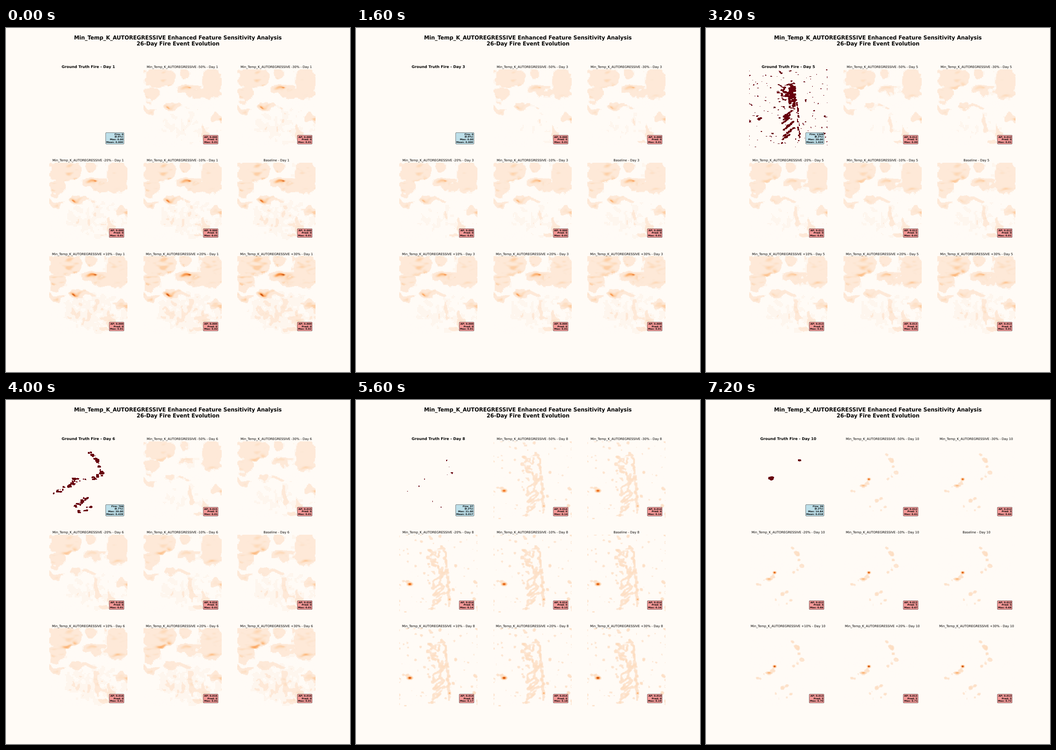
Animation, 748 px wide and 748 px high, one loop 8 s. Source, as a matplotlib script:

```python
import numpy as np
import matplotlib.pyplot as plt
from matplotlib.animation import FuncAnimation
from matplotlib.colors import LinearSegmentedColormap, to_rgb

plt.rcParams["text.hinting"] = "none"

N = 128                     # cells per side of a map
SIDE = 169.4                # map side in pixels; shapes below use this unit
PT = 17 / 18                # font scale for 44 dpi
FEATURE = "Min_Temp_K_AUTOREGRESSIVE"
SHIFTS = np.array([-50, -30, -20, -10, 0, 10, 20, 30]) / 100
PAPER = to_rgb("#fffbf6")
FIRE = to_rgb("#67000d")
HEAT = LinearSegmentedColormap.from_list(
    "heat", ["#fee9d8", "#fdd9b8", "#fdb576", "#f98a3c", "#d95309", "#8f3004"])

rng = np.random.default_rng(5)
axis = (np.arange(N) + 0.5) * SIDE / N
X, Y = np.meshgrid(axis, axis)
row, col = np.indices((N, N))
DOTS = ((row % 2 == 0) & (col % 2 == 0)) - 0.25


def blur(field, sx, sy=None):
    pad = np.pad(field * 1.0, 16, mode="edge")
    f = np.fft.fftfreq(N + 32)
    spread = (sx * f) ** 2 + ((sy or sx) * f[:, None]) ** 2
    gain = np.exp(-2 * np.pi ** 2 * spread)
    return np.fft.ifft2(np.fft.fft2(pad) * gain).real[16:-16, 16:-16]


def noise(sx, sy=None):
    n = blur(rng.standard_normal((N, N)), sx, sy)
    return (n - n.mean()) / n.std()


COARSE, MEDIUM, STREAK, RAGGED = noise(5), noise(2.2), noise(4, 1.6), noise(1.3, 0.8)
WX, WY = X + 3 * noise(4), Y + 3 * noise(4)     # warped space, for uneven rims


def lobe(cx, cy, rx, ry, power=2, x=X, y=Y):
    r2 = ((x - cx) / rx) ** 2 + ((y - cy) / ry) ** 2
    return np.exp(-0.69 * r2 ** (power / 2))


def stroke(x0, y0, x1, y1, width):
    dx, dy = x1 - x0, y1 - y0
    t = np.clip(((X - x0) * dx + (Y - y0) * dy) / (dx * dx + dy * dy), 0, 1)
    return np.hypot(X - x0 - t * dx, Y - y0 - t * dy) + 0.5 * RAGGED < width / 2


# Risk regions: centre, radii, strength on day 1 and on day 6
REGIONS = [
    (30, 20, 36, 22, 1, 1), (52, 20, 17, 20, 1, 0.95), (18, 54, 18, 17, 1, 1),
    (148, 34, 28, 36, 1.1, 1.1), (122, 54, 18, 12, 1, 0.5),
    (96, 44, 26, 13, 1, 0.75), (92, 8, 16, 8, 0.75, 0.7),
    (62, 82, 22, 8, 0.95, 0.6), (58, 75, 9, 9, 0.8, 0.8),
    (13, 91, 20, 8, 1, 1), (86, 82, 22, 5, 0.6, 0.72),
    (153, 106, 13, 10, 1, 0.95), (132, 138, 9, 15, 0.95, 0.8),
    (118, 158, 14, 7, 0.6, 0.8), (102, 122, 7, 28, 0.4, 0.95)]
HOLE = lobe(141, 116, 5, 9, 4)
VEIL = lobe(100, 122, 78, 46, 6)

# Hot spots, same columns
SPOTS = [
    (92, 43, 8, 5, 0.55, 0.25), (95, 43, 4, 3, 0.8, 0.25),
    (55, 80, 9, 4, 0.5, 0.1), (55, 81, 3, 2.5, 0.85, 0.1),
    (35, 40, 10, 4, 0.08, 0.38), (53, 31, 8, 6, 0.08, 0.34),
    (17, 92, 6, 4, 0.25, 0.16), (148, 58, 13, 4, 0.12, 0.36)]


def blend(shapes, day, **kw):
    u = (day - 1) / 5
    return np.max([(a + (b - a) * u) * lobe(*s, **kw)
                   for *s, a, b in shapes], axis=0)


def broad_map(day, shift):
    veil = 0.33 + 0.09 * np.cos(2 * np.pi * (day - 1) / 6)
    lower = (veil + 0.12 * MEDIUM + 0.07 * COARSE + 0.14 * DOTS) * VEIL
    level = blend(REGIONS, day, power=4, x=WX, y=WY) + 0.07 * MEDIUM
    level = np.maximum(level, lower) - 0.6 * HOLE + 0.1 * DOTS
    heat = blend(SPOTS, day, x=WX, y=WY)
    patch = 0.16 * (STREAK - 1 + 2.2 * shift) * (1 - 0.08 * day)
    patch = np.clip(patch, 0, 0.25) * (level > 0.75)
    shown = (level > 0.5 - 0.32 * shift) | (heat > 0.2)
    heat = heat * (1 + 0.8 * shift) * (1 + 0.35 * DOTS + 0.12 * STREAK) - 0.08
    return np.maximum(heat, patch), shown


# Fire fronts: key places with the size of the fire on day 6
FRONTS = [
    [(85, 26, 4), (95, 31, 6), (103, 42, 7), (108, 56, 5), (114, 69, 8),
     (98, 80, 4)],
    [(78, 84, 4), (55, 83, 7), (53, 93, 5), (43, 98, 7), (18, 109, 5)],
    [(82, 124, 5), (72, 131, 5), (56, 141, 5)],
    [(90, 143, 5), (64, 154, 4)]]
LAST = [(48, 81, 9), (109, 42, 4)]


def embers(front):
    """Key places, with small random fires on the way to the next one."""
    for (x, y, size), (nx, ny, _) in zip(front, front[1:] + front[-1:]):
        yield x, y, size
        for u in rng.uniform(0, 0.7, 5):
            yield (x + u * (nx - x) + rng.normal(0, 3),
                   y + u * (ny - y) + rng.normal(0, 2), rng.uniform(1.5, 4.5))


EMBERS = [e for front in FRONTS for e in embers(front)]


def outbreak():
    mass = np.maximum(lobe(93, 59, 10, 28, 6),
                      0.55 * lobe(75, 54, 13, 20, 6)) + 0.3 * RAGGED > 0.6
    mass |= stroke(20, 109, 25, 107, 5)
    for y in np.linspace(98, 148, 8):
        x = rng.uniform(71, 82)
        mass |= stroke(x, y + 5, x + 15, y - 6, 4)
    for y in np.linspace(74, 144, 9):
        x = rng.uniform(103, 109)
        mass |= stroke(x, y, x + 1, y + 5, 3)
    return mass


def dying(fires, loss):
    mask = np.zeros((N, N), bool)
    for x, y, size in fires:
        reach = np.hypot((X - x) / 1.4, Y - y) + 0.4 * RAGGED
        mask |= reach < (size - loss) / 2
    return mask


BURNT = {5: outbreak()}
BURNT.update({day: dying(EMBERS, 2.2 * (day - 6)) for day in (6, 7, 8)})
BURNT.update({day: dying(LAST, 10 - day) for day in (9, 10)})

# Scattered risk of day 7: centre, radii, strength
SCATTER = [
    (54, 19, 16, 9, 0.17), (24, 42, 14, 6, 0.13), (54, 34, 16, 5, 0.12),
    (150, 38, 15, 28, 0.1), (66, 82, 10, 6, 0.15), (84, 91, 17, 4, 0.16),
    (12, 93, 7, 4, 0.13), (75, 53, 8, 10, 0.42), (99, 45, 7, 4, 0.6)]
# Where an older fire still glows strongly: day, then as above
GLOWING = [(8, 23, 108, 4, 2.5, 0.95), (8, 109, 141, 2, 2, 0.55),
           (10, 55, 83, 2.5, 2, 1), (10, 43, 97, 5, 2, 0.5)]


def sparse_map(day, shift):
    if day == 7:
        heat = np.max([a * lobe(*s, x=WX, y=WY) for *s, a in SCATTER], axis=0)
        heat = heat * (1 + 0.35 * STREAK + 0.8 * DOTS) * (1 + 0.9 * shift)
    else:
        # the fire of three days before, brighter along its rim
        old = blur(BURNT[day - 3], 1.4)
        heat = 0.6 * old * (1 - old) * (1 + 0.3 * STREAK + 0.2 * DOTS)
        for d, *s, a in GLOWING:
            if d == day:
                heat = np.maximum(heat, a * lobe(*s))
        heat = heat * (1 + 0.25 * shift)
    return heat - 0.06, heat > 0.07


def prediction(day, shift):
    heat, shown = (broad_map if day <= 6 else sparse_map)(day, shift)
    rgb = HEAT(np.clip(heat, 0, 1))[..., :3]
    return np.where(shown[..., None], rgb, PAPER)


def truth(day):
    burnt = BURNT.get(day, np.zeros((N, N), bool))
    return np.where(burnt[..., None], FIRE, PAPER)


# cells, maximum, mean
FIRE_STATS = {5: (1348, 20, 1.024), 6: (766, 20, 0.428), 7: (195, 21, 0.109),
              8: (37, 21, 0.017), 9: (33, 16, 0.016), 10: (39, 14.84, 0.018)}
SCORE = {5: 0.01245, 6: 0.01575, 7: 0.01555, 8: 0.014, 9: 0.013, 10: 0.01265}
# highest risk: baseline, slope and curvature over the shift
PEAK = {1: (0.0131, 0.8, 0.3), 5: (0.007, 0.8, 0.3), 7: (0.042, 0.8, 0.3),
        8: (0.158, 0.55, 0.6), 9: (0.35, 0.4, 0.2), 10: (0.684, 0.19, -0.06)}


def truth_text(day):
    cells, peak, mean = FIRE_STATS.get(day, (0, 0, 0))
    return (f"Fire: {cells}\n({cells / N ** 2:.1%})\n"
            f"Max: {peak:.2f}\nMean: {mean:.3f}")


def score_text(day, s):
    base, slope, bend = PEAK.get(day, (0.0095, 0.8, 0.3))
    peak = base * (1 + slope * s + bend * s * s)
    count = int(5.2 - 16 * min(s, 0) ** 2) if peak > 0.5 else 0
    score = SCORE.get(day, 0) + 0.001 * max(s, -0.49)
    return f"AP: {abs(score):.3f}\nPred: {count}\nMax: {peak:.2f}"


fig, axes = plt.subplots(3, 3, figsize=(17, 17), dpi=44, facecolor=PAPER)
fig.subplots_adjust(left=0.125, right=0.9, bottom=0.11, top=0.88,
                    wspace=0.2, hspace=0.2)
fig.suptitle(f"{FEATURE} Enhanced Feature Sensitivity Analysis\n"
             "26-Day Fire Event Evolution",
             fontsize=20 * PT, fontweight="bold", y=0.98)

images, titles, boxes = [], [], []
for k, ax in enumerate(axes.flat):
    ax.axis("off")
    images.append(ax.imshow(np.ones((N, N, 3)),
                            interpolation="antialiased" if k else "nearest"))
    titles.append(ax.set_title("", fontsize=(12 if k else 14) * PT, pad=6 * PT,
                               fontweight="normal" if k else "bold"))
    boxes.append(ax.text(
        0.95, 0.05, "", transform=ax.transAxes, ha="right", va="bottom",
        fontsize=9 * PT, fontweight="bold",
        bbox=dict(boxstyle="round,pad=0.3", lw=PT, alpha=0.8,
                  facecolor="lightcoral" if k else "lightblue")))


def update(i):
    day = i + 1
    images[0].set_data(truth(day))
    titles[0].set_text(f"Ground Truth Fire - Day {day}")
    boxes[0].set_text(truth_text(day))
    for k, s in enumerate(SHIFTS, 1):
        images[k].set_data(prediction(day, s))
        name = f"{FEATURE} {s:+.0%}" if s else "Baseline"
        titles[k].set_text(f"{name} - Day {day}")
        boxes[k].set_text(score_text(day, s))
    return images + titles + boxes


anim = FuncAnimation(fig, update, frames=10, interval=800, repeat=True,
                     repeat_delay=0, blit=False)
plt.show()
```
